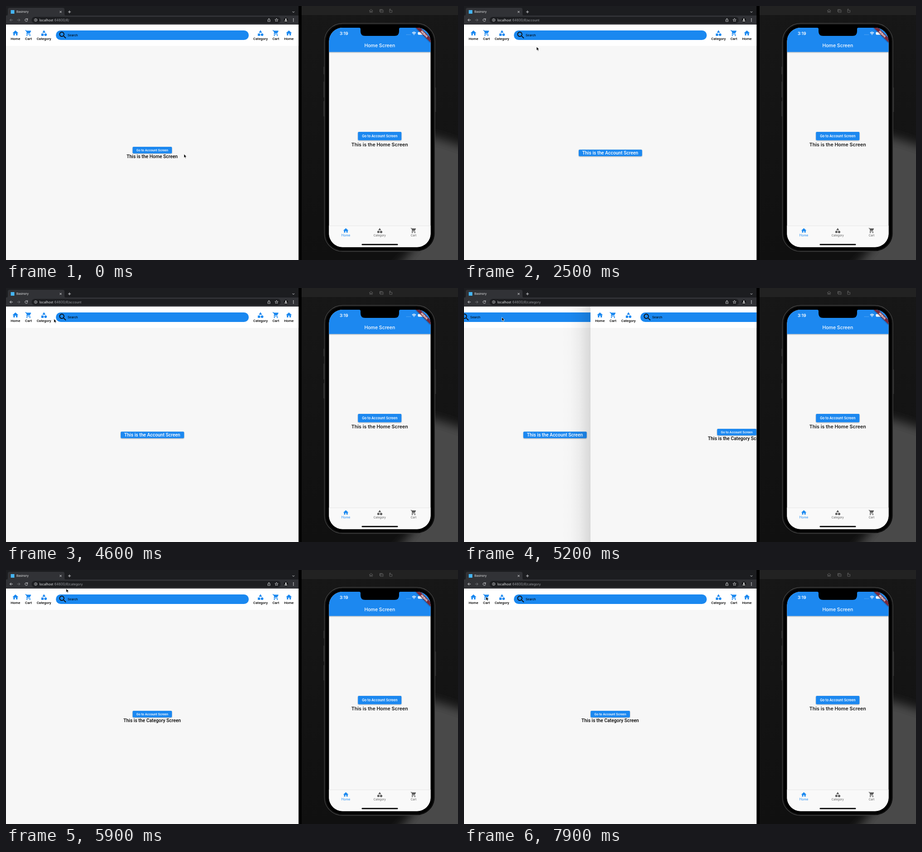
These frames come from a looping animation (997 by 561 pixels, 8000 ms). An HTML page:

```html
<!DOCTYPE html>
<html lang="en">
<head>
<meta charset="utf-8">
<title>Browser and phone demo</title>
<style>
html, body { margin: 0; width: 100%; height: 100%; overflow: hidden; background: #000; }
svg { display: block; width: 997px; height: 561px; }
text { font-family: Roboto, Arial, sans-serif; }
.sf { font-family: Inter, Roboto, sans-serif; }
.mid { text-anchor: middle; }
.med { font-weight: 500; }
.semi { font-weight: 600; }
.blue { fill: #1a88f0; }
.white { fill: #fff; }
.line { fill: none; stroke: #dcdde0; stroke-width: 1; stroke-linecap: round; stroke-linejoin: round; }
.dim { stroke: #77797d; }
</style>
</head>
<body>
<svg viewBox="0 0 997 561" xmlns="http://www.w3.org/2000/svg">
  <defs>
    <path id="home" d="M10 20v-6h4v6h5v-8h3L12 3 2 12h3v8z"/>
    <path id="cart" d="M7 18c-1.1 0-1.99.9-1.99 2S5.9 22 7 22s2-.9 2-2-.9-2-2-2zM1 2v2h2l3.6 7.59-1.35 2.45c-.16.28-.25.61-.25.96 0 1.1.9 2 2 2h12v-2H7.42c-.14 0-.25-.11-.25-.25l.03-.12.9-1.63h7.45c.75 0 1.41-.41 1.75-1.03l3.58-6.49c.08-.14.12-.31.12-.48 0-.55-.45-1-1-1H5.21l-.94-2H1zm16 16c-1.1 0-1.99.9-1.99 2s.89 2 1.99 2 2-.9 2-2-.9-2-2-2z"/>
    <path id="category" d="M12 2l-5.5 9h11zM13 17.5a4.5 4.5 0 1 0 9 0a4.5 4.5 0 1 0-9 0zM3 13.5h8v8H3z"/>
    <path id="search" d="M15.5 14h-.79l-.28-.27C15.41 12.59 16 11.11 16 9.5 16 5.91 13.09 3 9.5 3S3 5.91 3 9.5 5.91 16 9.5 16c1.61 0 3.09-.59 4.23-1.57l.27.28v.79l5 4.99L20.49 19l-4.99-5zm-6 0C7.01 14 5 11.99 5 9.5S7.01 5 9.5 5 14 7.01 14 9.5 11.99 14 9.5 14z"/>
    <clipPath id="view"><rect y="41" width="645.5" height="520"/></clipPath>
    <clipPath id="screen"><rect x="712.5" y="48" width="224" height="484.5" rx="30"/></clipPath>
    <linearGradient id="edge">
      <stop offset="0" stop-opacity="0"/><stop offset=".3" stop-opacity=".016"/>
      <stop offset=".6" stop-opacity=".07"/><stop offset="1" stop-opacity=".22"/>
    </linearGradient>
    <linearGradient id="desk" x2="0" y2="1">
      <stop offset="0" stop-color="#171717"/><stop offset="1" stop-color="#101010"/>
    </linearGradient>
    <filter id="drop" x="-10%" y="-30%" width="120%" height="180%">
      <feDropShadow dx="0" dy="1" stdDeviation=".9" flood-opacity=".35"/>
    </filter>
    <filter id="soft" x="-30%" y="-30%" width="160%" height="160%"><feGaussianBlur stdDeviation="11"/></filter>
    <clipPath id="right"><rect x="652" y="20" width="345" height="541"/></clipPath>
  </defs>

  <!-- web pages -->
  <g clip-path="url(#view)">
    <rect y="41" width="646" height="520" fill="#f7f7f7"/>
    <g id="pageHome"></g>
    <g id="pageAccount"></g>
    <g id="pageCategory"></g>
  </g>

  <!-- browser bars -->
  <rect width="645.5" height="22" fill="#1c1d20"/>
  <rect y="21" width="645.5" height="20" fill="#313236"/>
  <path d="M0 21.5Q4 21.5 4 17.500V8Q4 4 8 4H125Q129 4 129 8V17.500Q129 21.500 133 21.500Z" fill="#313236"/>
  <rect x="10.500" y="9" width="8" height="8" fill="#45b5f2"/>
  <text x="23" y="15.300" font-size="6.500" class="sf" fill="#e8e9eb">Basinory</text>
  <path class="line" d="M118.700 11.200l3.600 3.600m0-3.600l-3.600 3.600M140 10.300v5.400M137.300 13h5.400M632 12.300l2 2 2-2"/>
  <path id="back" class="line" d="M14.500 31H8.700M11.300 28.300L8.600 31l2.700 2.700"/>
  <path class="line dim" d="M25 31h5.800M28.200 28.300l2.700 2.700-2.700 2.700"/>
  <path class="line" d="M47.300 29.200A3 3 0 1 0 47.700 32.100M47.700 27.900v2.100h-2.100"/>
  <rect id="bar" x="56.500" y="24" width="549.500" height="14.200" rx="7.100" fill="#1d1e21"/>
  <g class="line" stroke-width=".8">
    <circle cx="65.500" cy="31" r="3" stroke-width=".8"/><path d="M65.500 30.800v1.600M65.500 29.300v.1"/>
    <path stroke-width=".8" d="M578.300 30h-.8v4.300h5V30h-.8M580 32v-4.500M578.700 28.700L580 27.400l1.300 1.300"/>
    <path stroke-width=".8" d="M596.700 27.500l1 2.300 2.500.2-1.900 1.700.6 2.400-2.200-1.300-2.200 1.300.6-2.400-1.900-1.700 2.500-.2z"/>
  </g>
  <circle cx="617.300" cy="31" r="5" fill="#17181a"/>
  <path class="white" d="M615.700 29.300a1.600 1.600 0 1 1 3.200 0a1.600 1.600 0 1 1-3.200 0M614.200 33.700q0-2 3.100-2t3.100 2z"/>
  <g fill="#e4e5e7"><circle cx="634" cy="28.200" r=".9"/><circle cx="634" cy="31" r=".9"/><circle cx="634" cy="33.800" r=".9"/></g>
  <rect id="mark" x="138.600" y="26.500" height="9" fill="#4d73a5"/>
  <g class="sf" font-size="7.200">
    <text class="sf" x="73.500" y="33.500" fill="#ecedef">localhost</text>
    <text class="sf" x="105" y="33.500" fill="#9a9ca1">:64600/#/</text>
    <text id="path" class="sf" x="139" y="33.500"></text>
  </g>
  <rect x="645.500" width="6.500" height="561" fill="#000"/>

  <!-- desktop behind the phone -->
  <rect x="652" width="345" height="561" fill="url(#desk)"/>
  <g clip-path="url(#right)">
    <path d="M925 285Q970 296 1030 318V600H830Q905 550 925 480Z" fill="#484848" filter="url(#soft)"/>
  </g>
  <rect x="652" width="345" height="20" fill="#222"/>
  <g class="line" style="stroke:#6c6c6c;stroke-width:.8">
    <path d="M801.500 10.500l3.700-3.200 3.700 3.200M802.500 10v4h2v-2.500h1.500V14h2v-4"/>
    <path d="M824.500 12.500v-5h5.500M826 9h6v5h-6zM828 11.500h2"/>
    <path d="M846.500 9.500h5V14h-5zM848.500 7.200h-2.300v2M847.200 6.300l-1 .9 1 .9"/>
  </g>

  <!-- phone -->
  <g fill="#2b2b2b">
    <rect x="700" y="134" width="3" height="17" rx="1"/><rect x="700" y="167" width="3" height="35" rx="1"/>
    <rect x="700" y="210" width="3" height="34" rx="1"/><rect x="945" y="180" width="3.500" height="54" rx="1"/>
  </g>
  <rect x="702.500" y="38.500" width="243.500" height="503.500" rx="40" fill="#000" stroke="#474747" stroke-width="1.300"/>
  <rect x="704.800" y="40.800" width="239" height="499" rx="38" fill="none" stroke="#1d1d1d"/>
  <g clip-path="url(#screen)">
    <rect x="712" y="48" width="225" height="485" fill="#f7f7f7"/>
    <rect class="blue" x="708" y="46" width="233" height="55.500" filter="url(#drop)"/>
    <path d="M779 48q3 0 3 3v5q0 10 10 10h65q10 0 10-10v-5q0-3 3-3z"/>
    <text class="sf semi white" x="736" y="64" font-size="9.200">3:19</text>
    <text class="sf med white mid" x="824.300" y="90.600" font-size="10.500">Home Screen</text>
    <path d="M883 63.300h9.500" fill="none" stroke="#fff" stroke-opacity=".4" stroke-dasharray="1.400 1.300"/>
    <g fill="none" stroke="#fff" stroke-width="1.400">
      <path d="M895.800 59.500q4.200-3.600 8.400 0M897.400 61.500q2.600-2.200 5.200 0"/><path d="M899.300 63.200h1.400"/>
    </g>
    <rect class="white" x="908.500" y="57.500" width="12" height="6" rx="1.700"/>
    <g transform="translate(936.5 48) rotate(45)">
      <rect x="-23" y="16.100" width="46" height="6.900" fill="#782b3a" filter="url(#drop)"/>
      <text class="white mid" y="21.600" font-size="5.800" font-weight="900">DEBUG</text>
    </g>
    <rect class="blue" x="776.300" y="278" width="96" height="18.600" rx="2" filter="url(#drop)"/>
    <text class="sf semi white mid" x="824.300" y="290" font-size="7.450">Go to Account Screen</text>
    <text class="sf semi mid" x="824.300" y="310.300" font-size="10.700" fill="#1b1b1b">This is the Home Screen</text>
    <rect x="712" y="485" width="225" height="48" fill="#f9f9f9"/>
    <rect x="712" y="485" width="225" height=".7" fill="#dedede"/>
    <g id="tabs"></g>
    <rect x="784.500" y="525.600" width="80" height="2.600" rx="1.300"/>
  </g>

  <!-- pointer -->
  <path id="arrow" d="M0 0V8.200L1.900 6.500 3.200 9.400 4.600 8.800 3.300 6H5.900Z" stroke="#fff" stroke-width=".7"/>
  <g id="beam" fill="none">
    <path d="M-2-4.500Q0-4.500 0-3V3Q0 4.500-2 4.500M2-4.500Q0-4.500 0-3M0 3Q0 4.500 2 4.500" stroke="#222" stroke-width="1.600"/>
    <path d="M-2-4.500Q0-4.500 0-3V3Q0 4.500-2 4.500M2-4.500Q0-4.500 0-3M0 3Q0 4.500 2 4.500" stroke="#ddd" stroke-width=".8"/>
  </g>
</svg>
<script>
const LOOP = 8000, STEP = 100, WIDTH = 645.5;
const $ = id => document.getElementById(id);

const icon = (name, cx, top, size, fill) =>
  `<use href="#${name}" fill="${fill}" transform="translate(${cx - size / 2} ${top}) scale(${size / 24})"/>`;

const label = (text, x, y, size, cls = '') =>
  `<text class="mid med ${cls}" x="${x}" y="${y}" font-size="${size}">${text}</text>`;

const button = (x, y, w, h) =>
  `<rect class="blue" x="${x}" y="${y}" width="${w}" height="${h}" rx="2" filter="url(#drop)"/>`;

const navItem = (name, x) =>
  icon(name.toLowerCase(), x, 52, 15.5, '#1a88f0') + label(name, x, 75, 7.9);

const header = '<rect y="41" width="645.5" height="47" fill="#fff"/>' +
  [['Home', 20.8], ['Cart', 49.5], ['Category', 83.7], ['Category', 561.3], ['Cart', 595.2], ['Home', 624]]
    .map(a => navItem(...a)).join('') +
  '<rect class="blue" x="110" y="54" width="425.500" height="21" rx="10.500"/>' +
  icon('search', 125.3, 54.200, 20.7, '#0b0b0b') +
  '<text x="136" y="67" font-size="7.240">Search</text>';

const page = body => `<rect y="41" width="645.5" height="520" fill="#f7f7f7"/>${header}${body}`;
const screenBody = name => button(279.3, 311, 86.7, 14.5) +
  label('Go to Account Screen', 322.6, 321, 7.24, 'white') +
  label(`This is the ${name} Screen`, 322.4, 335.6, 10.34);

$('pageHome').innerHTML = page(screenBody('Home'));
$('pageAccount').innerHTML = page(button(253, 317.2, 139.8, 14.5) +
  label('This is the Account Screen', 322.6, 328.3, 10.34, 'white'));
$('pageCategory').innerHTML =
  '<rect id="shade" x="-64.500" y="41" width="64.500" height="520" fill="url(#edge)"/>' +
  page(screenBody('Category'));

const tab = (name, x, size, fill) => icon(name.toLowerCase(), x, 489, 13.8, fill) +
  `<text class="sf mid" x="${x}" y="508.700" font-size="${size}" fill="${fill}">${name}</text>`;
$('tabs').innerHTML = tab('Home', 749.6, 7, '#1a88f0') +
  tab('Category', 824.3, 6.2, '#5a5a5a') + tab('Cart', 899, 6.2, '#5a5a5a');

// pointer stops: time, x, y
const stops = [
  [0, 392.5, 327], [1200, 392.5, 327], [1300, 356, 321], [1800, 352, 320], [2500, 160, 90],
  [2700, 160, 90], [3200, 157, 31], [3700, 157, 31], [4200, 128, 72], [4300, 128, 72],
  [4900, 83.5, 64.5], [5500, 83.5, 64.5], [6100, 150, 33], [6400, 154.5, 31],
  [7000, 154.5, 31], [7800, 48.5, 59], [LOOP, 48.5, 59]
];

function pointerAt(t) {
  const i = stops.findIndex(s => s[0] > t);
  const [t0, x0, y0] = stops[i - 1], [t1, x1, y1] = stops[i];
  const u = (t - t0) / (t1 - t0), k = u * u * (3 - 2 * u);
  return [x0 + (x1 - x0) * k, y0 + (y1 - y0) * k];
}

// cubic-bezier(.35, .91, .33, .97)
function slideEase(x) {
  if (x <= 0) return 0;
  if (x >= 1) return 1;
  const curve = (a, b, s) => 3 * (1 - s) ** 2 * s * a + 3 * (1 - s) * s * s * b + s ** 3;
  let lo = 0, hi = 1;
  for (let i = 0; i < 24; i++) {
    const m = (lo + hi) / 2;
    if (curve(.35, .33, m) < x) lo = m; else hi = m;
  }
  return curve(.91, .97, lo);
}

const within = (t, a, b) => t >= a && t < b;
const show = (id, on) => $(id).setAttribute('visibility', on ? 'visible' : 'hidden');
const move = (id, x, y) => $(id).setAttribute('transform', `translate(${x} ${y})`);

function draw(t) {
  const p = slideEase((t - 5039) / 720);
  show('pageHome', t < 1800);
  show('pageAccount', t >= 1800 && p < 1);
  show('pageCategory', p > 0);
  move('pageAccount', -p * WIDTH / 3, 0);
  move('pageCategory', (1 - p) * WIDTH, 0);
  $('shade').setAttribute('opacity', p);

  const focus = within(t, 3200, 3900) || within(t, 6300, 7300);
  const marked = within(t, 3400, 3900) || within(t, 6400, 7300);
  const route = t < 1800 ? '' : t < 5000 ? 'account' : 'category';
  $('path').textContent = route;
  $('path').setAttribute('fill', marked ? '#fff' : '#9a9ca1');
  $('mark').setAttribute('width', route === 'account' ? 28.8 : 31.5);
  show('mark', marked);
  $('bar').setAttribute('stroke', focus ? '#5f97e8' : 'none');
  $('bar').setAttribute('stroke-width', 1.3);
  $('back').classList.toggle('dim', !route);

  const [x, y] = pointerAt(t);
  const inBar = within(x, 56, 606) && within(y, 23, 39);
  show('arrow', !inBar);
  show('beam', inBar);
  move('arrow', x, y);
  move('beam', x, y);
}

function tick() {
  draw(Math.floor(performance.now() % LOOP / STEP) * STEP);
  requestAnimationFrame(tick);
}
tick();
</script>
</body>
</html>
```
